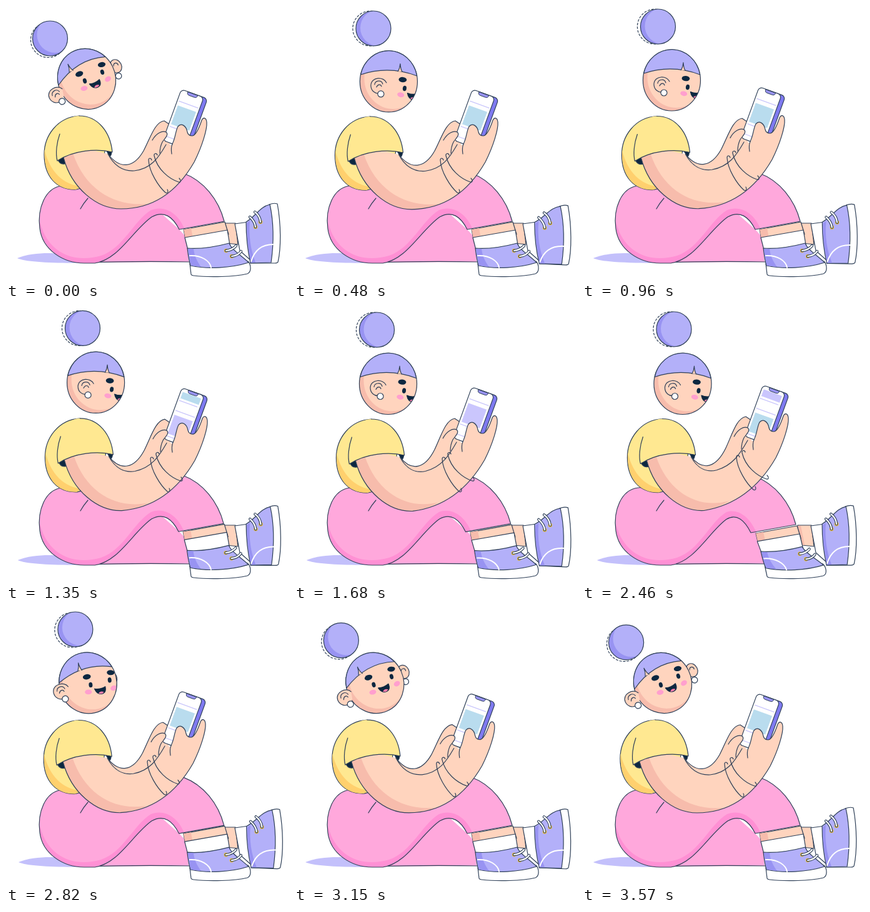
An HTML page for the animation above (3.6 s loop, 451 by 439 pixels).

```html
<!DOCTYPE html>
<html lang="en">
<head>
<meta charset="utf-8">
<title>Reading on the phone</title>
<style>
html, body { margin: 0; width: 100%; height: 100%; overflow: hidden; background: #fff; }
svg { display: block; width: 100vw; height: 100vh; }
</style>
</head>
<body>
<svg id="stage" viewBox="0 0 451 439"></svg>
<script>
const LOOP = 3600;
const INK = '#2f4058', SKIN = '#ffd4be', BLUSH = '#f7bcac', LILAC = '#b3b0f9', VIOLET = '#9893f2',
  PINK = '#ffa8dc', ROSE = '#ff90d4', YELLOW = '#ffe891', AMBER = '#ffd06e', NAVY = '#0c2740', WHITE = '#fff';
const stage = document.getElementById('stage');
const warped = [];

function el(parent, tag, attrs) {
  const node = document.createElementNS('http://www.w3.org/2000/svg', tag);
  for (const k in attrs) node.setAttribute(k, attrs[k]);
  parent.appendChild(node);
  return node;
}
const group = (parent, attrs = {}) => el(parent, 'g', attrs);
function path(parent, d, fill, line, warp, width = 1.2) {
  const node = el(parent, 'path', {
    d, fill: fill || 'none', stroke: line || 'none', 'stroke-width': width,
    'stroke-linejoin': 'round', 'stroke-linecap': 'round'
  });
  if (warp) warped.push({ node, d, warp });
  return node;
}
const dot = (parent, cx, cy, rx, ry, fill, line, turn = 0) => el(parent, 'ellipse', {
  cx, cy, rx, ry, fill, stroke: line || 'none', 'stroke-width': 1.2, transform: `rotate(${turn} ${cx} ${cy})`
});
const clip = (id) => el(defs, 'clipPath', { id });
const defs = el(stage, 'defs', {});

// Motion
const clamp = (v) => Math.max(0, Math.min(1, v));
const ease = (v) => { v = clamp(v); return v * v * (3 - 2 * v); };
const mix = (a, b, w) => a + (b - a) * w;
function track(t, keys) {
  let i = 0;
  while (i < keys.length - 2 && t >= keys[i + 1][0]) i++;
  const a = keys[i], b = keys[i + 1], w = ease((t - a[0]) / (b[0] - a[0]));
  return a.slice(1).map((v, j) => mix(v, b[j + 1], w));
}
const TORSO = [[0, 0, 0], [480, 4.5, 1], [820, 4, .7], [960, 2.5, .5], [1100, -2, 0], [1680, 6.5, 2],
  [2460, 11.5, 1.5], [2820, -.8, .5], [3240, 0, 0], [LOOP, 0, 0]];
const HAND = [[0, 0, 0], [480, 5, 0], [960, 3, -4], [1100, -1, -5], [1680, 4, -7],
  [2460, 9, -10], [2820, -2, -4], [3240, 0, 0], [LOOP, 0, 0]];
const WRIST = [[0, 0, 0], [480, 6, 0], [960, 4, -4], [1100, -1, -5], [1680, 9, -5],
  [2460, 19, -8], [2820, -2, -3.5], [3240, 0, 0], [LOOP, 0, 0]];
// x, y, tilt, turn
const HEAD = [[0, 129, 117, -26, 0], [60, 129, 117, -26, 0], [420, 151.5, 121, 0, 1], [800, 150, 120.5, 0, 1],
  [960, 143.5, 119, 0, 1], [1100, 139, 118, 0, 1], [1680, 150.5, 121.5, 0, 1], [2460, 161, 121.5, 0, 1],
  [2800, 131, 117, -13.5, .26], [2900, 131, 117, -13.5, .24], [3240, 129, 117, -26, 0], [LOOP, 129, 117, -26, 0]];
// x, y, rim offset
const BUN = [[0, 70.5, 52, -3, 2.5], [60, 70.5, 52, -3, 2.5], [350, 119, 33.5, -5, 0], [480, 127, 36, -5, 0],
  [800, 126, 35, -5, 0], [960, 121.5, 33, -5, 0], [1080, 115, 30.5, -5, 0], [1680, 132.5, 35, -5, 0],
  [2460, 147, 34, -5, 0], [2800, 111, 31, -5, 1], [2900, 110, 31, -5, 1], [3250, 67, 53, -3, 2.5],
  [3450, 72, 51, -3, 2.5], [LOOP, 70.5, 52, -3, 2.5]];
const LEG = [[0, 0], [1100, 0], [1680, .35], [2460, 1], [2820, .05], [3240, 0], [LOOP, 0]];
const FLOOR = [[0, 0], [240, -6], [480, 0], [1100, 0], [1680, 2], [2460, 6], [2820, 2], [3240, 0], [LOOP, 0]];

const now = {};
const arm = (x) => {
  const w = ease((x - 160) / 90);
  return [mix(now.torso[0], now.hand[0], w), mix(now.torso[1], now.hand[1], w)];
};
const torso = () => now.torso;
const pants = (x, y) => {
  const w = now.leg * ease((x - 215) / 50) * clamp((410 - y) / 40);
  return [-7 * w, 2 * w];
};
const shin = (x, y) => {
  const w = now.leg * clamp((428 - y) / 60);
  return [-6 * w, 3 * w];
};
const tap = (x) => {
  const w = now.tap * clamp((x - 376) / 48);
  return [4.6 * w, 3.2 * w];
};

// Floor shadow
const floor = path(stage, 'M18,404 C38,396 66,395 88,397 L145,411 C90,413 32,411 18,404Z', '#c3c0fb');

// Shoe details shared by both feet
function laces(parent, list, warp) {
  for (const [x1, y1, cx, cy, x2, y2] of list) {
    dotPath(parent, x1, y1, warp);
    const d = `M${x1},${y1} Q${cx},${cy} ${x2},${y2}`;
    path(parent, d, '', INK, warp, 4.4);
    path(parent, d, '', WHITE, warp, 2.2);
  }
}
function dotPath(parent, x, y, warp) {
  path(parent, `M${x},${y} L${x},${y + .1}`, '', '#e5b93c', warp, 6.5);
}

// Far foot
path(stage, 'M345,348 L367,348 L371,382 L352,380Z', SKIN, INK);
path(stage, 'M345,349 L350,349 L356,380 L350,380Z', BLUSH);
path(stage, 'M366,349 L388,346 L393,409 L374,392Z', WHITE, INK);
path(stage, 'M421,318 C426,316 431,316 434,317 C440,350 440,388 435,410 Q434,412 430,412 L391,412 L420,408Z', WHITE, INK, tap);
path(stage, 'M384,346 C399,337 407,321 422,318 C429,350 428,382 424,411 L391,412 C386,390 384,368 384,346Z', LILAC, INK, tap);
path(stage, 'M385,348 L390,344 C388,368 391,390 399,411 L392,411 C387,390 385,368 385,348Z', VIOLET, '', tap);
path(stage, 'M392,409 C398,390 410,382 427,382', '', WHITE, tap, 2);
laces(stage, [[399, 354, 398, 345, 390, 338], [407, 346, 406, 336, 398, 330]], tap);

// Trousers, far leg first
path(stage, 'M140,411 L292,410 L288,370 L277,358 L240,325 L190,345Z', PINK);
path(stage, 'M125,411 C190,409 250,409 294,410', '', INK);
path(stage, 'M284,358 L350,346 L356,366 L287,374Z', SKIN, INK, shin);
path(stage, 'M284,358 L296,356 L299,372 L287,374Z', BLUSH, '', shin);
path(stage, 'M286,371 L354,359 L358,383 L291,391Z', WHITE, INK, shin);
path(stage, 'M294,413 L296,430 Q297,432 300,432 C325,435 365,434 386,429 Q391,427 391,420 Q391,413 387,409Z', WHITE, INK, shin);
path(stage, 'M290,388 C312,390 338,385 357,380 C361,391 377,400 388,411 C360,420 322,422 295,416 C292,406 291,397 290,388Z', LILAC, INK, shin);
path(stage, 'M291,389 L300,389 C301,399 305,409 312,418 L296,416 C293,406 292,397 291,389Z', VIOLET, '', shin);
path(stage, 'M294,400 C312,399 326,408 328,419', '', WHITE, shin, 2);
laces(stage, [[352, 392, 362, 391, 368, 384], [361, 401, 371, 400, 376, 393]], shin);

const thigh = 'M90,288 C62,291 50,325 54,356 C58,391 92,412 125,412 L142,412 ' +
  'C180,407 203,359 233,338 C253,327 267,338 277,358 L349,345 C340,310 316,280 284,268Z';
path(stage, thigh, PINK, '', pants);
path(stage, 'M54,346 C54,390 92,412 125,412 L142,412 C180,407 203,359 233,338 C253,327 267,338 277,358 L285,356 ' +
  'C274,330 252,319 232,327 C204,344 188,388 152,400 C110,412 68,398 54,346Z', ROSE, '', pants);
path(stage, thigh, '', INK, pants);
path(stage, 'M119,325 Q124,316 131,308', '', INK);

// Shirt body
path(stage, 'M117,176 C82,178 61,208 61,238 C61,272 80,295 112,294 L150,285 L160,220Z', YELLOW, INK, torso);
path(stage, 'M61.5,230 C60,272 80,295 112,294 L119,289 C92,286 70,266 61.5,230Z', AMBER, '', torso);
path(stage, 'M83,246 C86,255 95,256 108,246 L100,236Z', NAVY, INK, torso);
path(stage, 'M160,231 L169,233 Q169,239 166,241Z', NAVY, INK, torso);

// Far arm
path(stage, 'M163,237 C182,262 204,260 220,232 C231,211 238,186 253,184 L262,190 L262,232 L238,254 L206,266 L172,258Z', SKIN, '', arm);
path(stage, 'M163,237 C182,262 204,260 220,232 C231,211 238,186 253,184 L262,190', '', INK, arm);

// Phone
const phone = group(stage);
const tilted = group(phone, { transform: 'translate(280.5 133.5) rotate(20)' });
const slab = (u, fill) => el(tilted, 'rect', {
  x: u, y: 0, width: 38, height: 87, rx: 6, fill, stroke: INK, 'stroke-width': 1.2
});
slab(6.5, '#7f7af0');
slab(0, WHITE);
el(clip('screen'), 'rect', { x: 1, y: 6, width: 36, height: 79, rx: 4 });
const feed = group(group(tilted, { 'clip-path': 'url(#screen)' }));
for (let k = -1; k < 4; k++) {
  const y = k * 60;
  path(feed, `M3,${y + 19} H35 M3,${y + 62} H33`, '', '#c9c6fb', null, 1.3);
  el(feed, 'rect', { x: 3.5, y: y + 26, width: 31, height: 32, fill: k % 2 ? '#cac6fd' : '#b9dcee' });
}
path(tilted, 'M11,.4 H28 Q28,5 24,5 H15 Q11,5 11,.4Z', VIOLET, INK, null, .9);

// Fingers of the far hand
path(stage, 'M234,215 C240,204 250,199 256,202 C261,206 254,213 250,220 L243,242 L226,242Z', SKIN, '', arm);
path(stage, 'M234,215 C240,204 250,199 256,202 C261,206 254,212 250,218 C247,224 246,230 246,236', '', INK, arm);

// Near arm
path(stage, 'M92,243 C105,292 145,325 184,325 C242,325 278,290 301,250 C314,224 322,197 321,186 ' +
  'C320,178 315,178 313,183 C309,195 304,207 298,208 C293,208 291,206 290,202 C288,191 280,187 275,193 ' +
  'C271,200 271,212 266,223 L258,222 C246,243 232,261 205,264 C188,265 173,256 163,237 L125,228Z', SKIN, '', arm);
path(stage, 'M92,243 C105,292 145,325 184,325 C200,325 214,322 226,317 C176,322 127,296 107,236Z', BLUSH, '', arm);
path(stage, 'M92,243 C105,292 145,325 184,325 C242,325 278,290 301,250 C314,224 322,197 321,186 ' +
  'C320,178 315,178 313,183 C309,195 304,207 298,208 C293,208 291,206 290,202 C288,191 280,187 275,193 ' +
  'C271,200 271,212 266,221 C264,226 264,231 265,237', '', INK, arm);
path(stage, 'M163,237 C173,256 188,265 205,264 C232,261 244,243 256,222', '', INK, arm);

// Bracelets
const bracelets = group(stage);
path(bracelets, 'M233,247 C232,243 228,243 228,247 C229,266 244,289 255,299 C259,301 260,297 258,294', '', INK);
path(bracelets, 'M242,239 C241,235 236,236 237,240 C242,262 261,277 276,282 C280,283 280,279 277,276', '', INK);

// Sleeve
path(stage, 'M86,205 C90,188 102,176 117,176 C147,176 167,202 170,234 C145,228 108,231 82,248 C79,236 82,219 86,205Z', YELLOW, '', torso);
path(stage, 'M117,176 C147,176 167,202 170,234 C145,228 108,231 82,248 C79,236 81,219 86,205', '', INK, torso);

// Head, built around its own centre
const head = group(stage);
const farEar = group(head);
dot(farEar, 51, 2, 9, 11, SKIN, INK);
path(farEar, 'M48,0 C50,-5 56,-3 55,2', '', INK);
dot(farEar, 48, 18, 4.8, 4.8, WHITE, INK);
dot(head, 0, 0, 46, 49, BLUSH);
el(clip('face'), 'ellipse', { rx: 46, ry: 49 });
const face = group(head, { 'clip-path': 'url(#face)' });
dot(face, 7, -5, 46, 49, SKIN);
const features = group(face);
dot(features, -10.2, 11.7, 5.6, 3.8, '#ff9fce', '', 12);
dot(features, 30.6, 14.9, 5.2, 4, '#ff9fce', '', -8);
dot(features, -7, -12.5, 6.4, 4.2, NAVY, '', 4);
dot(features, 31.7, -10.2, 6.2, 4, NAVY, '', 16);
dot(features, -4, 1.4, 3, 4.2, NAVY, '', 8);
dot(features, 27.3, 1, 3, 4.2, NAVY, '', 8);
path(features, 'M.5,9 Q9,12.5 18,9.5 Q18,20 9.5,19.5 Q2,18.5 .5,9Z', NAVY, NAVY);
path(features, 'M5,17.5 Q9,13.5 14,17.5 Q10,21 5,17.5Z', '#ff7fae');
dot(head, 0, 0, 46, 49, 'none', INK);
const hair = path(head, '', LILAC, INK);
const part = path(head, '', SKIN, INK);
const ear = group(head);
path(ear, 'M12,-4 C8,-14 -12,-14 -13,0 C-13,9 -6,14 1,13 L9,8Z', SKIN);
path(ear, 'M12,-4 C8,-14 -12,-14 -13,0 C-13,9 -6,14 1,13 M-7,-1 C-6,-8 4,-9 6,-2 M-4,3 C-2,-2 3,-2 4,2', '', INK);
dot(ear, 3, 14, 5, 5, WHITE, INK);

// Bun
const bun = group(stage);
const rim = el(bun, 'circle', { r: 28, fill: WHITE, stroke: INK, 'stroke-width': 1.2, 'stroke-dasharray': '4 2' });
el(clip('ball'), 'circle', { r: 28 });
const ball = group(bun, { 'clip-path': 'url(#ball)' });
el(ball, 'circle', { r: 28, fill: VIOLET });
const shine = el(ball, 'circle', { r: 29, fill: LILAC });
el(bun, 'circle', { r: 28, fill: 'none', stroke: INK, 'stroke-width': 1.2 });

const move = (node, x, y, turn = 0) =>
  node.setAttribute('transform', `translate(${x.toFixed(2)} ${y.toFixed(2)}) rotate(${turn.toFixed(2)})`);

function drawHair(turn) {
  const yr = mix(-19, -9, turn), xr = 46 * Math.sqrt(1 - (yr / 49) ** 2), top = mix(-36, -26, turn);
  hair.setAttribute('d', `M-44.8,-11 A46,49.5 0 0 1 ${xr},${yr} Q0,${top} -44.8,-11Z`);
  const x = mix(-17, 18, turn), w = (x + 45) / 90;
  const y = (1 - w) ** 2 * -11 + 2 * w * (1 - w) * top + w * w * yr;
  part.setAttribute('d', `M${x - 3},${y} Q${x},${y - 5} ${x + .5},${y - 12} Q${x + 1},${y - 4} ${x + 3.5},${y + .6}`);
}

function render(t) {
  now.torso = track(t, TORSO);
  now.hand = track(t, HAND);
  now.leg = track(t, LEG)[0];
  now.tap = .5 - .5 * Math.cos(2 * Math.PI * t / 1200);
  for (const { node, d, warp } of warped) {
    node.setAttribute('d', d.replace(/(-?[\d.]+),(-?[\d.]+)/g, (m, x, y) => {
      const [dx, dy] = warp(+x, +y);
      return (+x + dx).toFixed(2) + ',' + (+y + dy).toFixed(2);
    }));
  }
  move(floor, track(t, FLOOR)[0], 0);
  move(phone, ...now.hand);
  move(bracelets, ...track(t, WRIST));
  move(feed, 0, -60 * (ease((t - 1150) / 320) + ease((t - 2300) / 260)));

  const [x, y, tilt, turn] = track(t, HEAD);
  move(head, x, y, tilt);
  move(features, 29.5 * turn, 9.6 * turn);
  move(ear, mix(-54, -15.5, turn), mix(1, 6, turn));
  move(farEar, -50 * turn, 0);
  drawHair(turn);

  const [bx, by, rx, ry] = track(t, BUN);
  move(bun, bx, by);
  move(rim, rx, ry);
  move(shine, 8, -1 - ry * 2);
}

function frame(ms) {
  render(ms % LOOP);
  requestAnimationFrame(frame);
}
render(0);
requestAnimationFrame(frame);
</script>
</body>
</html>
```
